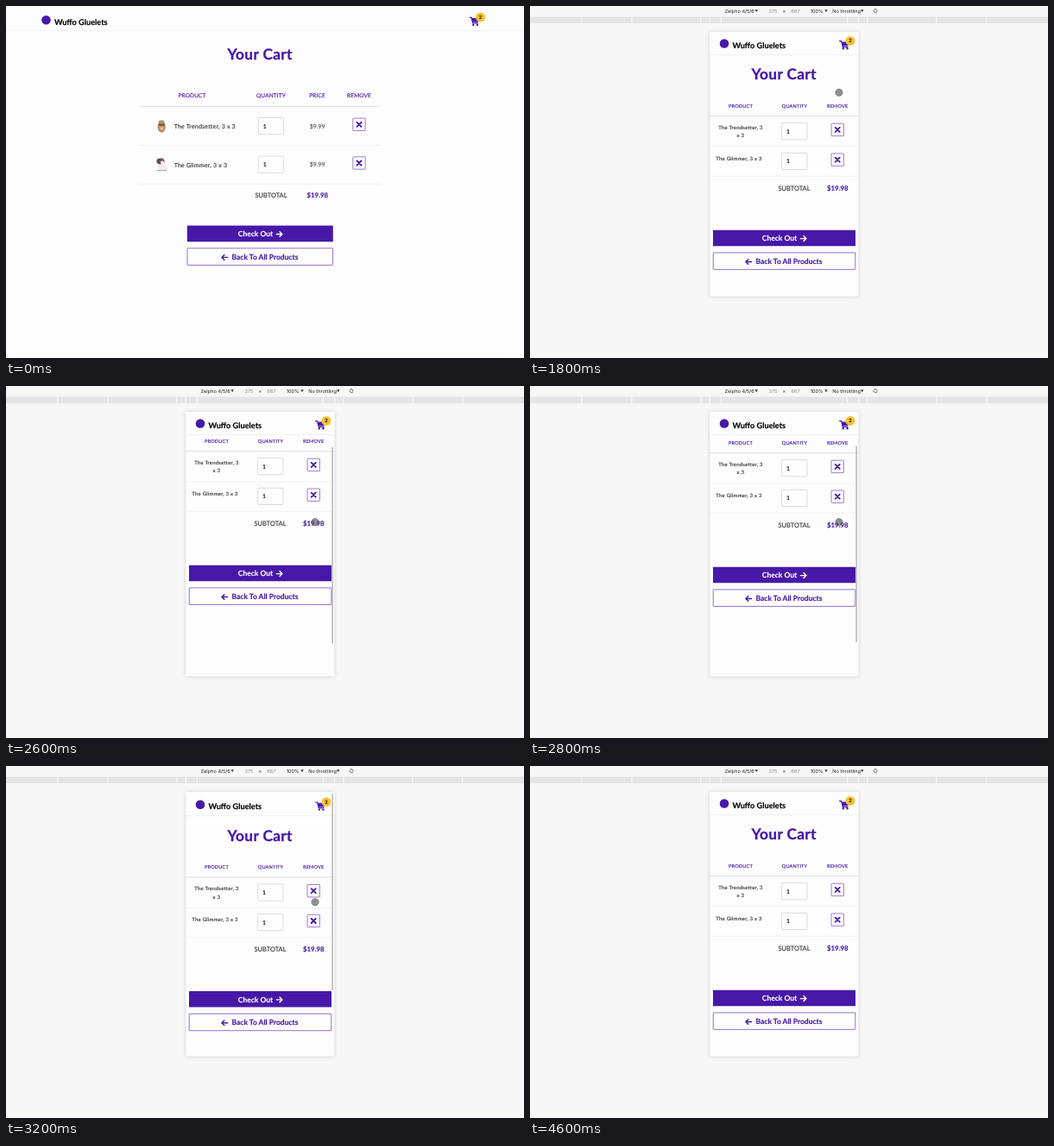
These frames come from a looping animation (600x408 px, 4.7 s). An HTML page:

```html
<!DOCTYPE html>
<html lang="en">
<head>
<meta charset="utf-8">
<style>
  html, body { margin: 0; width: 100%; height: 100%; overflow: hidden; background: #fdfdfd; }
  svg { display: block; width: 600px; height: 408px; }
  text { font-family: Lato, sans-serif; white-space: pre; text-rendering: geometricPrecision; }
  .tool text { font-family: Inter, "Liberation Sans", sans-serif; font-size: 5.6px; }
</style>
</head>
<body>
<svg id="stage" viewBox="0 0 600 408"></svg>
<script>
const LOOP = 4700, SWITCH = 1400;
const PURPLE = '#4718a8', INK = '#333', LINE = '#f0f0f0';
const stage = document.getElementById('stage');

// A hairline stroke gives the small type a medium weight.
const text = (x, y, s, size, { fill = INK, weight = 400, anchor = 'middle', gap = 0, bold = 0.14 } = {}) =>
  `<text x="${x}" y="${y}" font-size="${size}" fill="${fill}" stroke="${fill}" stroke-width="${bold}" font-weight="${weight}" text-anchor="${anchor}" letter-spacing="${gap}">${s}</text>`;
const rect = (x, y, w, h, fill, stroke = 'none', line = 0.8) =>
  `<rect x="${x}" y="${y}" width="${w}" height="${h}" rx=".5" fill="${fill}" stroke="${stroke}" stroke-width="${line}"/>`;
const rule = (x1, x2, y, color) =>
  `<path d="M${x1} ${y}H${x2}" stroke="${color}" stroke-width=".8"/>`;
const dot = (x, y, r, fill) => `<circle cx="${x}" cy="${y}" r="${r}" fill="${fill}"/>`;
const oval = (x, y, rx, ry, fill) => `<ellipse cx="${x}" cy="${y}" rx="${rx}" ry="${ry}" fill="${fill}"/>`;

const arrow = (x, y, dir, color) =>
  `<path transform="translate(${x} ${y}) scale(${dir} 1)" d="M-3.6 0H3.2M.2-3.3L3.5 0L.2 3.3" fill="none" stroke="${color}" stroke-width="1.4"/>`;

const title = y => text(294.2, y, 'Your Cart', 17.3, { fill: PURPLE, weight: 700, gap: 0.35, bold: 0.3 });

const labels = (y, size, items) => items.map(([x, s]) =>
  text(x, y, s, size, { fill: PURPLE, gap: 0.15 })).join('');

const quantity = (x, y) =>
  rect(x, y, 29.3, 19.2, '#fefefe', '#d4d4d4') +
  text(x + 5.4, y + 12.1, '1', 6.8, { fill: '#111', weight: 700, anchor: 'start', bold: 0 });

const remove = (x, y) =>
  rect(x - 7.2, y - 7.2, 14.4, 14.4, '#fbfaff', '#7450c0', 0.7) +
  `<path d="M${x - 2.5} ${y - 2.5}l5 5m0-5l-5 5" stroke="${PURPLE}" stroke-width="1.9" stroke-linecap="round"/>`;

const subtotal = (x, priceX, y) =>
  text(x, y, 'SUBTOTAL', 7.5) +
  text(priceX, y, '$19.98', 7.8, { fill: PURPLE, weight: 700 });

const buttons = (x, y, w) =>
  rect(x, y, w, 18.6, PURPLE) +
  text(289, y + 12.6, 'Check Out', 8.5, { fill: '#fff', weight: 700 }) +
  arrow(316.4, y + 9.9, 1, '#fff') +
  rect(x + 0.2, y + 26.2, w - 0.4, 19.5, '#fefefe', '#7450c0', 0.8) +
  text(300, y + 39.2, 'Back To All Products', 8.5, { fill: PURPLE, weight: 700 }) +
  arrow(253.5, y + 36.8, -1, PURPLE);

const brand = (x, y) =>
  dot(x, y, 5.3, PURPLE) +
  text(x + 9.4, y + 5.3, 'Wuffo Gluelets', 9.2, { fill: '#000', weight: 700, anchor: 'start' });

const basket = (x, y) =>
  `<g transform="translate(${x} ${y})">
    <path d="M0 .7H2L3.6 7.3H9.4" fill="none" stroke="${PURPLE}" stroke-width="1.2" stroke-linecap="round"/>
    <path d="M2.2 1.4H11L9.8 6.2H3.4Z" fill="${PURPLE}"/>
    ${dot(4.2, 9.3, 1.2, PURPLE)}${dot(8.9, 9.3, 1.2, PURPLE)}
    ${dot(12.4, 0.4, 5.5, '#f9c232')}
    ${text(12.4, 2.4, '2', 5.8, { fill: '#222', weight: 700 })}
  </g>`;

const stickers =
  oval(180.2, 140, 4.6, 6.6, '#c08a60') + oval(180.2, 134, 3.4, 1.8, '#a39a78') +
  rect(176.6, 136.8, 7.2, 1.8, '#6b4434') + oval(180.3, 142, 2.2, 1.8, '#e4bfa0') +
  `<path d="M176.4 191Q175.4 184 178 181H183Q186 186 186 191Z" fill="#f1eeec" stroke="#d0d0d0" stroke-width=".4"/>` +
  oval(179, 180, 4.6, 3.4, '#6a4c42') + oval(181, 181.4, 2, 2.2, '#f6f0eb') +
  `<path d="M179.6 177.4L181 174.6L182 177.6Z" fill="#c9a9a0"/>` + rule(174.5, 186, 190.6, '#999');

function desktop() {
  const prices = [141.6, 186].map(y => text(360.7, y, '$9.99', 7, { fill: '#555' })).join('');
  const name = { anchor: 'start', gap: 0.2 };
  return rect(0, 0, 600, 408, '#fdfdfd') + rule(0, 600, 28.5, LINE) +
    brand(46.5, 16.2) + basket(537.1, 12.6) + title(62.2) +
    labels(106.4, 6.5, [[215.5, 'PRODUCT'], [307, 'QUANTITY'], [360.5, 'PRICE'], [409, 'REMOVE']]) +
    rule(154, 434, 116.5, '#dedbf3') + rule(154, 434, 161.5, LINE) + rule(154, 434, 206.3, LINE) +
    stickers +
    text(194.7, 142.2, 'The Trendsetter, 3 x 3', 7, name) +
    text(194.7, 186.8, 'The Glimmer, 3 x 3', 7, name) +
    quantity(292.4, 129.5) + quantity(292.4, 174.2) + prices +
    remove(409, 137.3) + remove(409, 182) +
    subtotal(307, 360.8, 222.4) + buttons(209.8, 254.6, 169);
}

function toolbar() {
  const menu = (x, s, end) => text(x, 7.5, s, 5.6, { fill: '#222', anchor: 'start', bold: 0 }) +
    `<path d="M${end} 4.2h3.6l-1.8 3z" fill="#444"/>`;
  const size = (x, s) => text(x, 7.5, s, 5.6, { fill: '#888', bold: 0 });
  const ticks = [234.5, 176.5, 96.5, 86.3, 73].flatMap(d => [294.4 - d, 294.4 + d])
    .map(x => `<path d="M${x} 12.4V20" stroke="#fafafa"/>`).join('');
  return `<g class="tool">${rect(0, 12.4, 600, 7.6, '#e4e4e4')}${ticks}
    ${menu(225.6, 'Zelpho 4/5/6', 260.4)}
    ${size(281.5, '375')}${text(294.3, 7.6, '×', 5.6, { bold: 0 })}${size(307.5, '667')}
    ${menu(324.7, '100%', 341.2)}${menu(350.2, 'No throttling', 383)}
    <path d="M398.3 3.8a2.6 2.6 0 0 1 4 2M402 7.4a2.6 2.6 0 0 1-4-2M400.2 3.6l2.3 2-2.4 2.3-2.3-2z" fill="none" stroke="#666" stroke-width=".6"/>
  </g>`;
}

function mobile() {
  const name = { gap: 0.2 };
  return rect(0, 0, 600, 408, '#f7f7f7') + toolbar() +
    `<defs>
      <clipPath id="screen"><rect x="208.4" y="30" width="172" height="306.5"/></clipPath>
      <filter id="soft"><feGaussianBlur stdDeviation="2.5"/></filter>
    </defs>
    <rect x="208" y="30" width="172.6" height="307" fill="#000" opacity=".14" filter="url(#soft)"/>` +
    rect(208.4, 30, 172, 306.5, '#fdfdfd') +
    `<g clip-path="url(#screen)">
      <g id="page">` + title(85.4) +
        labels(118, 5.6, [[244, 'PRODUCT'], [306.5, 'QUANTITY'], [356.2, 'REMOVE']]) +
        rule(208, 381, 127.6, '#d9d9e2') + rule(208, 381, 163, LINE) + rule(208, 381, 197.3, LINE) +
        text(244, 143, 'The Trendsetter, 3', 6, name) + text(243.8, 152.3, 'x 3', 6, name) +
        text(242, 178.6, 'The Glimmer, 3 x 3', 6, name) +
        quantity(291.6, 135.6) + quantity(291.6, 170.3) +
        remove(356.2, 143.4) + remove(356.2, 178.2) +
        subtotal(306, 356.3, 213.8) + buttons(212, 259.7, 165) +
      `</g>
      <g id="bar">` + rect(208, 20, 173, 36.4, '#fdfdfd') + rule(208, 381, 56.5, LINE) +
        brand(225, 43.5) + basket(358.6, 40) +
      `</g>
      <rect id="thumb" x="377.4" width="1.5" height="228" rx=".75" fill="#b4b4b4"/>
    </g>
    <circle id="touch" r="4.2" fill="#555" fill-opacity=".65" stroke="#555" stroke-width=".6" stroke-opacity=".7"/>`;
}

stage.innerHTML = `<g id="wide">${desktop()}</g><g id="phone">${mobile()}</g>`;
const [wide, phone, page, bar, thumb, touch] =
  ['wide', 'phone', 'page', 'bar', 'thumb', 'touch'].map(id => document.getElementById(id));

// Linear track through [time, value] points, held at both ends.
function track(points, t) {
  const i = points.findIndex(p => p[0] > t);
  if (i < 0) return points[points.length - 1][1];
  if (i === 0) return points[0][1];
  const [t0, a] = points[i - 1], [t1, b] = points[i];
  return a + (b - a) * (t - t0) / (t1 - t0);
}

const SCROLL = [[2200, 0], [2300, 3], [2400, 12], [2600, 52], [2700, 60], [2800, 50],
  [2900, 26], [3000, 3], [3100, -5], [3200, -1.3], [3300, 0]];
const TOUCH_X = [[1600, 366], [1800, 358], [3200, 358], [3300, 385], [3400, 510]];
const TOUCH_Y = [[1600, 45], [1800, 100.3], [2100, 157.7], [3200, 157.7], [3400, 190]];
const THUMB = [[2200, 0], [2300, 1], [3800, 1], [4000, 0]];

const show = (el, on) => el.setAttribute('visibility', on ? 'inherit' : 'hidden');
const shift = (el, x, y) => el.setAttribute('transform', `translate(${x} ${y})`);

function draw(now) {
  const t = Math.floor((now % LOOP) / 100) * 100; // ten steps a second
  const scroll = track(SCROLL, t);
  show(wide, t < SWITCH);
  show(phone, t >= SWITCH);
  show(touch, t >= 1600 && t < 3500);
  shift(page, 0, -scroll);
  shift(bar, 0, Math.max(0, -scroll));
  thumb.setAttribute('y', 32 + Math.max(0, scroll) * 0.745);
  thumb.setAttribute('opacity', track(THUMB, t));
  shift(touch, track(TOUCH_X, t), track(TOUCH_Y, t));
}

const start = performance.now();
function tick() {
  draw(performance.now() - start);
  requestAnimationFrame(tick);
}
tick();
</script>
</body>
</html>
```
